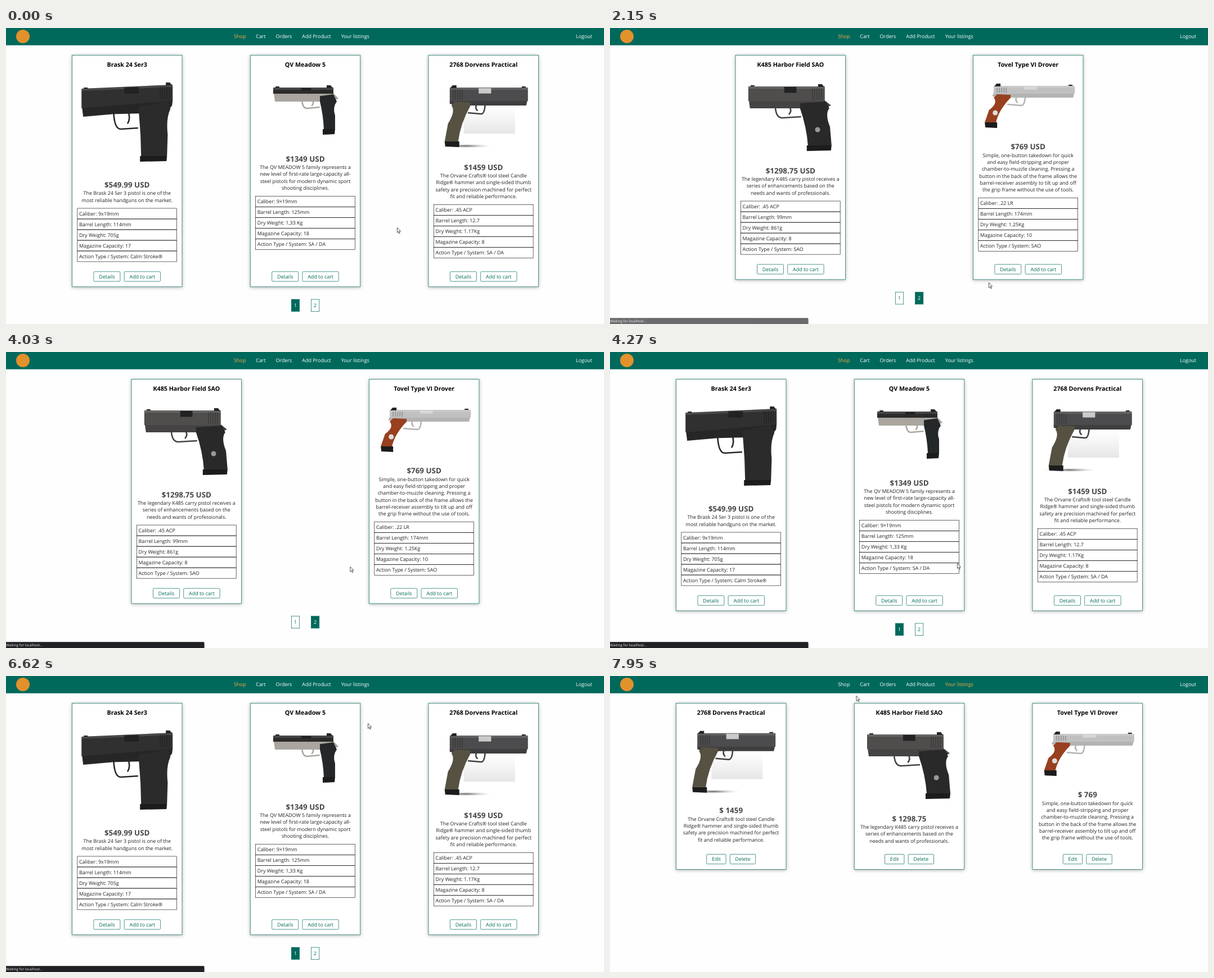
These frames come from a looping animation (1063x527 px, 8 s). An HTML page:

```html
<!DOCTYPE html>
<html lang="en">
<head>
<meta charset="utf-8">
<title>Shop</title>
<style>
  html, body { margin: 0; width: 100%; height: 100%; overflow: hidden; background: #fefefe; }
  svg { display: block; width: 100%; height: 100%; cursor: default; }
  text { font: 8.94px "Open Sans", sans-serif; fill: #222; text-rendering: geometricPrecision; }
  .mid { text-anchor: middle; }
  .end { text-anchor: end; }
  .title { font-size: 10.72px; font-weight: 700; fill: #000; }
  .price { font-size: 13.4px; font-weight: 700; fill: #464646; }
  .card, .button rect { fill: #fff; stroke: #00695c; stroke-width: .7; }
  .card { filter: drop-shadow(0 1.3px 3.2px rgba(0,0,0,.3)); }
  .row { fill: none; stroke: #000; stroke-width: .6; }
  .button text { fill: #00695c; }
  .button.on rect { fill: #00695c; }
  .button.on text { fill: #fff; }
  .nav { fill: #fff; }
  .nav.on { fill: #ffab40; }
  .art, #status, #cursor { pointer-events: none; }
  #status text { font-size: 6.3px; fill: #eee; }
</style>
</head>
<body>
<svg id="stage" viewBox="0 0 1063 527"></svg>
<script>
const CENTER = 532, CARD_TOP = 48.6, CARD_WIDTH = 195.5, ROW = 19, LINE = 12.29;

const products = {
  brask: { title: 'Brask 24 Ser3', cost: '549.99', priceY: 279.2,
    lines: ['The Brask 24 Ser 3 pistol is one of the', 'most reliable handguns on the market.'],
    specs: ['9x19mm', '114mm', '705g', '17', 'Calm Stroke®'],
    art: { muzzle: -81, top: 101, length: 162, height: 28, sag: 7, frame: 15, guard: 43, depth: 32,
      grip: 100, width: 56, lean: 2, bottom: 137, metal: '#303030', body: '#262626', handle: '#2b2b2b' } },
  meadow: { title: 'QV Meadow 5', cost: '1349', priceY: 233,
    lines: ['The QV MEADOW 5 family represents a', 'new level of first-rate large-capacity all-',
      'steel pistols for modern dynamic sport', 'shooting disciplines.'],
    specs: ['9×19mm', '125mm', '1,33 Kg', '18', 'SA / DA'],
    art: { muzzle: -57, top: 106, length: 107, height: 11, frame: 14, guard: 30, depth: 15,
      grip: 81, width: 30, lean: 5, bottom: 84, metal: '#2c2c2c', body: '#aaa69f', handle: '#252829' } },
  dorvens: { title: '2768 Dorvens Practical', cost: '1459', priceY: 248, listTrim: 8.5,
    lines: ['The Orvane Crafts® tool steel Candle', 'Ridge® hammer and single-sided thumb',
      'safety are precision machined for perfect', 'fit and reliable performance.'],
    specs: ['.45 ACP', '12.7', '1.17Kg', '8', 'SA / DA'],
    art: { muzzle: 79, top: 106, length: 139, height: 24, frame: 8, guard: 24, depth: 18, sheen: true, port: '#cacaca',
      grip: 100, width: 34, lean: 20, bottom: 106, metal: '#4c4c4e', body: '#3e3e3e', handle: '#575143' } },
  harbor: { title: 'K485 Harbor Field SAO', cost: '1298.75', priceY: 254,
    lines: ['The legendary K485 carry pistol receives a', 'series of enhancements based on the',
      'needs and wants of professionals.'],
    specs: ['.45 ACP', '99mm', '861g', '8', 'SAO'],
    art: { muzzle: -75, top: 104, length: 136, height: 26, frame: 13, guard: 42, depth: 20, medal: '#999',
      grip: 90, width: 52, lean: 12, bottom: 115, metal: '#504e4d', body: '#454343', handle: '#292929' } },
  tovel: { title: 'Tovel Type VI Drover', cost: '769', priceY: 211.5,
    lines: ['Simple, one-button takedown for quick', 'and easy field-stripping and proper',
      'chamber-to-muzzle cleaning. Pressing a', 'button in the back of the frame allows the',
      'barrel-receiver assembly to tilt up and off', 'the grip frame without the use of tools.'],
    specs: ['.22 LR', '174mm', '1.25Kg', '10', 'SAO'],
    art: { muzzle: 83, top: 103, length: 144, height: 14, frame: 7, guard: 24, depth: 17, medal: '#ddd', port: '#d8d8d8',
      grip: 112, width: 30, lean: 24, bottom: 75, metal: '#c0c0c0', body: '#b3b3b3', handle: '#98401f' } }
};
const labels = ['Caliber', 'Barrel Length', 'Dry Weight', 'Magazine Capacity', 'Action Type / System'];

const shape = (fill, d) => `<path fill="${fill}" d="${d}"/>`;
const line = (color, width, d) => `<path fill="none" stroke="${color}" stroke-width="${width}" d="${d}"/>`;
const disc = (fill, x, y, r) => `<circle fill="${fill}" cx="${x}" cy="${y}" r="${r}"/>`;
const rect = (cls, x, y, w, h, rx = 0) => `<rect class="${cls}" x="${x}" y="${y}" width="${w}" height="${h}" rx="${rx}"/>`;
const text = (x, y, s, cls = '') => `<text x="${x}" y="${y}" class="${cls}">${s}</text>`;

// A flat product silhouette, x running from the muzzle to the rear.
function pistol(cx, dy, { muzzle, top, length, height, sag = 0, frame, guard, depth, grip, width, lean, bottom,
  metal, body, handle, port = '#222', medal, sheen }) {
  const under = height + frame + sag, back = grip + width, heel = bottom - 10;
  const backdrop = sheen ? `<ellipse cx="111" cy="104" rx="52" ry="4" fill="url(#soft)"/>
    <rect x="23" y="34" width="91" height="48" fill="url(#sheen)"/>` : '';
  const ribs = [0, 1, 2, 3, 4].map(i => `M${length - 6 - i * 4} 3V${height - 2}`).join('');
  return `<g class="art" transform="translate(${cx + muzzle} ${top + dy}) scale(${-Math.sign(muzzle)} 1)">` + backdrop +
    line(body, 2.6, `M${grip - guard} ${under - 3}q1 ${depth} ${guard * .3} ${depth}L${grip + lean / 3} ${under + depth - 5}` +
      `M${grip - guard * .4} ${under - 3}q5 ${depth * .4} -1 ${depth * .7}`) +
    shape(body, `M1 ${height + 2 * sag - 1}L${length} ${height - 1}L${back + 5} ${height + frame * .6}L${back - 5} ${under}` +
      `L${grip - guard} ${under + sag / 3}L3 ${height + frame + 2 * sag}Z`) +
    shape(handle, `M${grip + 2} ${under - frame * .7}L${back - 4} ${height + 1}L${back + 2} ${height + frame}` +
      `Q${back - 6} ${under + 10} ${back + lean * .6 - 4} ${(under + heel) / 2}L${back + lean - 6} ${heel}H${grip + lean + 4}` +
      `Q${grip + lean * .8 + 4} ${(under + heel) / 2} ${grip + 2} ${under}Z`) +
    shape('#1c1c1c', `M${grip + lean + 2} ${heel}H${back + lean - 6}l-1 9L${grip + lean + 2} ${bottom}Z`) +
    shape(metal, `M0 ${sag}L${length} 0V${height}L0 ${height + 2 * sag}Z`) +
    shape('rgba(255,255,255,.12)', `M0 ${sag}L${length} 0V4L0 ${sag + 4}Z`) +
    shape(port, `M${length * .47} ${sag / 2 + 1}h${length * .16}v${height * .4}h${-length * .16}Z`) +
    shape('#262626', `M4 ${sag}v-2h7v2ZM${length - 12} 1v-5h7l4 5Z`) +
    line('rgba(0,0,0,.3)', 1.2, ribs) +
    (medal ? disc(medal, grip + width / 2 + lean * .6, (under + bottom) / 2, 4.5) : '') + '</g>';
}

const button = (x, y, w, h, label, active = false, rx = 0) =>
  `<g class="link button" ${active ? 'data-active="1"' : ''}>${rect('', x, y, w, h, rx)}${text(x + w / 2, y + h / 2 + 3.1, label, 'mid')}</g>`;

function buttonPair(cx, y, [first, w1], [second, w2]) {
  const gap = 7.2, x = cx - (w1 + gap + w2) / 2;
  return button(x, y, w1, 17.3, first, false, 1.6) + button(x + w1 + gap, y, w2, 17.3, second, false, 1.6);
}

// Vertical positions that follow from a product's price line.
function layout(key, listing) {
  const p = products[key], trim = listing && p.listTrim || 0;
  const priceY = p.priceY - trim, lastLine = priceY + 15 + (p.lines.length - 1) * LINE;
  const tableY = lastLine + 14.5;
  return { p, trim, priceY, tableY, end: listing ? lastLine + 6 : tableY + labels.length * ROW };
}

function card(key, cx, bottom, listing) {
  const { p, trim, priceY, tableY } = layout(key, listing), left = cx - CARD_WIDTH / 2;
  const table = labels.map((label, i) => rect('row', left + 9.4, tableY + i * ROW, 176.7, ROW) +
    text(left + 12.5, tableY + i * ROW + 12.6, `${label}: ${p.specs[i]}`)).join('');
  return rect('card', left, CARD_TOP, CARD_WIDTH, bottom - CARD_TOP) +
    text(cx, 69.4, p.title, 'mid title') +
    pistol(cx, -trim / 2, p.art) +
    text(cx, priceY + 4.8, listing ? `$ ${p.cost}` : `$${p.cost} USD`, 'mid price') +
    p.lines.map((s, i) => text(cx, priceY + 18.2 + i * LINE, s, 'mid')).join('') +
    (listing ? buttonPair(cx, bottom - 27, ['Edit', 34.4], ['Delete', 45.4])
      : table + buttonPair(cx, bottom - 27, ['Details', 47], ['Add to cart', 64.4]));
}

function buildPage(keys, current) {
  const listing = !current, n = keys.length;
  const pitch = CARD_WIDTH + (1071.6 - n * CARD_WIDTH) / (n + 1);
  const bottom = Math.max(...keys.map(k => layout(k, listing).end)) + 44.8;
  const cards = keys.map((k, i) => card(k, CENTER + (i - (n - 1) / 2) * pitch, bottom, listing)).join('');
  const pager = listing ? '' : [1, 2].map(i =>
    button(472.2 + 35.1 * i, bottom + 22.3, 14.4, 21.6, i, i === current)).join('');
  return `<g class="page">${cards}${pager}</g>`;
}

const navItem = (s, i) => `<tspan class="link nav" dx="${i ? 17.9 : 0}">${s}</tspan>`;
const stage = document.getElementById('stage');
stage.innerHTML = `
  <defs>
    <radialGradient id="soft"><stop stop-color="#555"/><stop offset="1" stop-color="#fff" stop-opacity="0"/></radialGradient>
    <linearGradient id="sheen" x2="0" y1="1" y2="0"><stop stop-color="#e6e6e6"/><stop offset="1" stop-color="#fff"/></linearGradient>
  </defs>
  <path fill="#00695c" d="M0 0H1063V30.7H0Z"/>
  ${disc('#e3912b', 30, 15, 12)}
  ${text(525.5, 18.2, ['Shop', 'Cart', 'Orders', 'Add Product', 'Your listings'].map(navItem).join(''), 'mid')}
  ${text(1042, 18.2, navItem('Logout', 0), 'end')}
  ${buildPage(['brask', 'meadow', 'dorvens'], 1)}
  ${buildPage(['harbor', 'tovel'], 2)}
  ${buildPage(['dorvens', 'harbor', 'tovel'])}
  <g id="status"><path fill="#202124" d="M0 516.2H351Q352.6 516.2 352.6 518V527H0Z"/>${text(0, 523.8, 'Waiting for localhost...')}</g>
  <g id="cursor" fill="#fff" stroke="#111" stroke-width=".7" stroke-linejoin="round">
    <path d="M.4 .4V9.4L2.4 7.5 3.9 10.9 5.3 10.3 3.8 7H6.6Z"/>
    <path d="M-1 7V1Q0-.6 1 1V5Q2 4 2.9 5.2Q4 4.5 4.6 5.7Q5.8 5.2 6 6.6V10L5 13.6H0L-3 9.2Q-3.2 7.4-1 8.5Z"/>
    <path fill="none" d="M-2.3-5.8H-.8L0-5.2.8-5.8H2.3M0-5.2V5.2M-2.3 5.8H-.8L0 5.2.8 5.8H2.3"/>
  </g>`;

const pageNodes = [...stage.querySelectorAll('.page')];
const navNodes = [...stage.querySelectorAll('.nav')];
const links = [...stage.querySelectorAll('.link')];
const status = document.getElementById('status');
const cursor = document.getElementById('cursor');

// Pointer moves: start, end, target x, target y.
const moves = [
  [450, 990, 550, 495], [1140, 1610, 673, 453], [2770, 3320, 518, 481],
  [3630, 4110, 617, 376], [5200, 5670, 507, 70], [5750, 5990, 535, 16],
  [6070, 6300, 620, 16], [6460, 7010, 693, 231], [7320, 7950, 437.5, 35]
];
const loads = [[1140, 2150], [3470, 4500], [6460, 7320]];
const STEP_MS = 78;
const clamp = v => Math.max(0, Math.min(1, v));

function pointerAt(t) {
  let x = 695, y = 355;
  for (const [start, end, tx, ty] of moves) {
    if (t < start) break;
    const gaps = Math.round((end - start) / STEP_MS);
    const u = clamp((Math.floor((t - start) / (end - start) * gaps + 1e-6) + 1) / (gaps + 1));
    const e = u * u * (3 - 2 * u);
    x += (tx - x) * e;
    y += (ty - y) * e;
  }
  return [x, y];
}

const showOnly = (nodes, index) => nodes.forEach((node, i) => node.style.display = i === index ? '' : 'none');

function draw(t) {
  const page = t < 1920 ? 0 : t < 4270 ? 1 : t < 7010 ? 0 : 2;
  showOnly(pageNodes, page);
  status.style.opacity = Math.max(...loads.map(([from, to]) =>
    t < from ? 0 : Math.min(clamp((t - from + 80) / 240), clamp((to + 160 - t) / 240))));

  const [x, y] = pointerAt(t);
  const box = stage.getBoundingClientRect();
  const under = document.elementFromPoint(x * box.width / 1063, y * box.height / 527);
  const link = under && under.closest('.link');
  const activeNav = navNodes[page === 2 ? 4 : 0];
  for (const node of links) {
    node.classList.toggle('on', node === link || node === activeNav || 'active' in node.dataset);
  }
  showOnly([...cursor.children], link ? 1 : under && under.tagName === 'text' ? 2 : 0);
  cursor.setAttribute('transform', `translate(${x} ${y})`);
}

function tick() {
  draw(performance.now() % 8000);
  requestAnimationFrame(tick);
}
tick();
</script>
</body>
</html>
```
